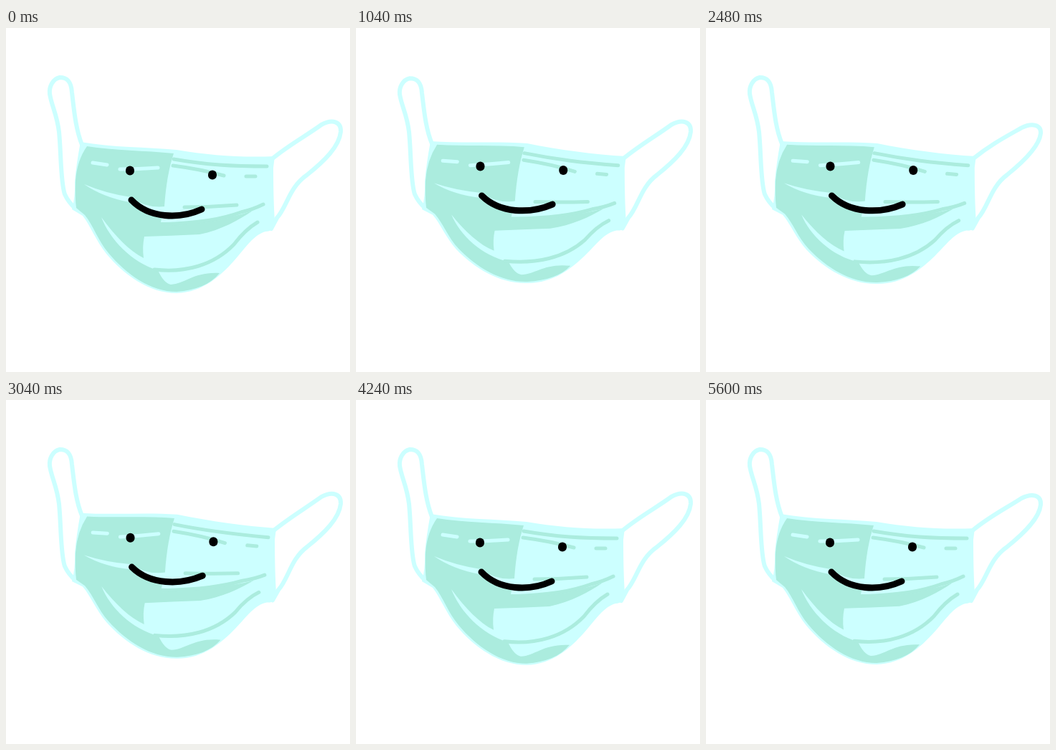
These frames come from a looping animation (480x480 px, 5.68 s). An HTML page:

```html
<!DOCTYPE html>
<html lang="en">
<head>
<meta charset="utf-8">
<title>Smiling mask</title>
<style>
html, body { margin: 0; width: 100%; height: 100%; overflow: hidden; background: #fff; }
svg { display: block; width: 100vw; height: 100vh; }
path { fill: none; stroke-width: 5; stroke-linecap: round; stroke-linejoin: round; }
.light { fill: #cff; }
.mint { fill: #abecde; }
.light-line { stroke: #cff; }
.mint-line { stroke: #abecde; }
.loop { stroke: #cff; stroke-width: 6; }
.eye { stroke: #000; stroke-width: 12; }
.smile { stroke: #000; stroke-width: 9; }
</style>
</head>
<body>
<svg viewBox="0 0 480 480">
  <!-- ear loops -->
  <path class="loop" d="M106,163 C97,140 95,115 92,90 C91,73 84,69 75,69 C65,71 60,82 61,92 C64,110 71,120 74,145 C77,175 76,215 82,232 Q87,243 97,252"/>
  <path class="loop" d="M372,182 C395,163 418,151 440,135 C455,127 468,130 467,145 C465,165 445,185 420,205 C395,222 392,250 378,265 L370,280"/>

  <!-- cloth -->
  <path class="light" d="M104,159 C150,167 195,166 238,170 C285,178 330,181 375,179 L373,195 Q373,240 375,270 Q374,284 362,284 C345,289 335,306 318,325 C300,345 275,369 238,370 C200,370 165,345 140,315 C125,296 118,276 107,262 L92,253 Q97,235 96,215 Q98,190 104,159 Z"/>
  <path class="mint" d="M113,165 C150,171 195,171 234,175 Q224,205 221,249 L216,271 C255,272 300,270 344,255 C325,268 300,282 270,288 Q230,290 193,291 Q190,305 192,321 C172,311 152,290 133,264 C145,295 175,327 212,338 Q220,356 230,358 C250,357 262,340 298,342 C285,358 265,366 238,368 C202,368 168,344 143,314 C128,296 122,276 110,261 L98,251 Q96,235 97,213 Q99,185 113,165 Z"/>

  <!-- folds -->
  <path class="mint-line" d="M207,337 C250,342 290,331 318,302 Q334,281 351,271"/>
  <path class="mint-line" d="M218,274 C270,272 300,267 328,257 Q345,253 359,246"/>
  <path class="mint-line" d="M249,250 Q285,250 322,247"/>
  <path class="mint-line" d="M234,183 C280,191 315,193 364,193"/>
  <path class="mint-line" d="M233,192 Q272,197 304,206"/>
  <path class="mint-line" d="M335,207 L348,207"/>
  <path class="light-line" d="M121,188 L141,191"/>
  <path class="light-line" d="M159,197 Q185,197 212,195"/>
  <path class="light" d="M109,218 Q140,231 174,236 Q195,252 222,249 L219,266 Q195,260 172,243 Q135,236 109,218 Z"/>

  <!-- face -->
  <path class="eye" d="M173,198.5 L173,199.5"/>
  <path class="eye" d="M288,204.5 L288,205.5"/>
  <path class="smile" d="M175,240 C200,266 242,267 273,253"/>
</svg>
<script>
const STEP = 80, STEPS = 71;
const BREATHS = 12, LEFT_DIPS = 7, RIGHT_DIPS = 11;

// [phase, face offset, chin offset] over one breath
const breath = [
  [0, 0, 0], [.141, -7.5, -8], [.197, -6, -14], [.239, -6, -13],
  [.718, -8, -3], [.775, -3, -2], [.831, 0, -1], [1, 0, 0]
];

const clamp = v => Math.max(0, Math.min(1, v));
const mix = (a, b, k) => a + (b - a) * k;
const bump = (phase, centre, width) => {
  const d = Math.abs(phase - centre) / width;
  return d < 1 ? (1 + Math.cos(Math.PI * d)) / 2 : 0;
};

function breathAt(phase) {
  const i = breath.findIndex(key => key[0] > phase);
  const a = breath[i - 1], b = breath[i];
  const k = (phase - a[0]) / (b[0] - a[0]);
  return { face: mix(a[1], b[1], k), chin: mix(a[2], b[2], k) };
}

function poseAt(step) {
  const phase = cycles => step * cycles / STEPS % 1;
  return {
    ...breathAt(phase(BREATHS)),
    left: 10 * bump(phase(LEFT_DIPS), .48, .26),
    right: 5 * bump(phase(RIGHT_DIPS), .79, .11)
  };
}

// The cloth is pinned at both sides; the loops sag at their tips.
function warp(x, y, pose) {
  if (x < 100 && y < 120) return [x, y + pose.left * clamp((120 - y) / 52)];
  if (x > 400) return [x, y + pose.right * clamp((155 - y) / 22)];
  const hold = 1 - clamp(Math.abs(x - 235) / 140) ** 2;
  const upper = pose.face * mix(1.5, 1.25, clamp((y - 172) / 25));
  const shift = mix(upper, pose.chin, clamp((y - 270) / 90));
  return [x - .3 * pose.face * clamp((x - 100) / 275), y + shift * hold];
}

const parts = [...document.querySelectorAll('path')].map(el => ({ el, d: el.getAttribute('d') }));

function draw(now) {
  const pose = poseAt(Math.floor(now / STEP) % STEPS);
  for (const { el, d } of parts) {
    el.setAttribute('d', d.replace(/([\d.]+),([\d.]+)/g, (_, x, y) =>
      warp(+x, +y, pose).map(v => v.toFixed(2)).join()));
  }
}

let start;
function tick(now) {
  start ??= now;
  draw(now - start);
  requestAnimationFrame(tick);
}
draw(0);
requestAnimationFrame(tick);
</script>
</body>
</html>
```
